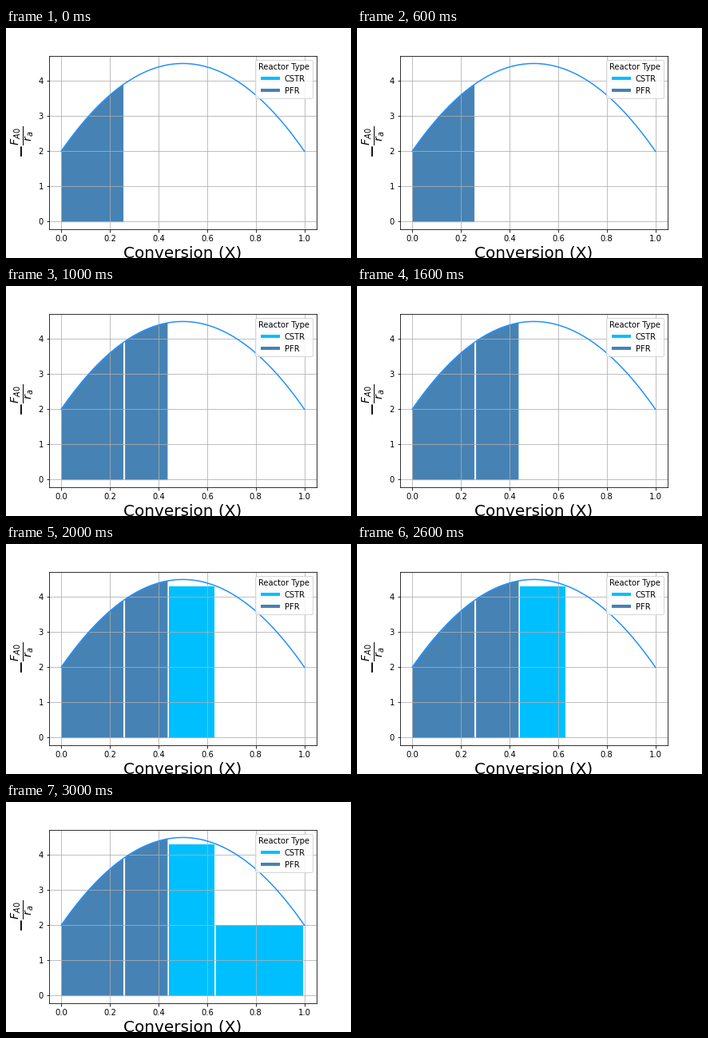
Write a matplotlib script that moves like this. It is 432 px wide and 288 px high and loops after 4000 ms.

```python
import matplotlib.pyplot as plt
import numpy as np
from matplotlib.animation import FuncAnimation
from matplotlib.lines import Line2D

COLORS = {"CSTR": "deepskyblue", "PFR": "steelblue"}
# Each reactor with the conversion reached at its outlet
REACTORS = [("PFR", 0.26), ("PFR", 0.44), ("CSTR", 0.636), ("CSTR", 1.0)]


def levenspiel(x):
    return 2 + 10 * x - 10 * x**2


plt.rcParams["font.family"] = "DejaVu Sans"
fig, ax = plt.subplots(figsize=(6, 4), dpi=72)
fig.subplots_adjust(left=0.125, right=0.9, bottom=0.125, top=0.88)

conversion = np.linspace(0, 1, 100)
ax.plot(conversion, levenspiel(conversion), color="dodgerblue")
ax.set_xlim(-0.05, 1.05)
ax.set_ylim(-0.225, 4.725)
ax.grid(True)
ax.set_xlabel("Conversion (X)", fontsize=20)
ax.set_ylabel(r"$-\frac{F_{A0}}{r_a}$", fontsize=20)
handles = [Line2D([], [], color=color, lw=4) for color in COLORS.values()]
ax.legend(handles, COLORS, title="Reactor Type", loc="upper right")


def add_reactor(kind, start, end):
    x = conversion[(conversion >= start) & (conversion < end)]
    height = levenspiel(x) if kind == "PFR" else levenspiel(end)
    return ax.fill_between(x, 0, height, color=COLORS[kind])


areas = []
inlet = 0
for kind, outlet in REACTORS:
    areas.append(add_reactor(kind, inlet, outlet))
    inlet = outlet


def update(frame):
    for i, area in enumerate(areas):
        area.set_visible(i <= frame)
    return areas


anim = FuncAnimation(fig, update, frames=len(REACTORS), interval=1000, repeat=True)
plt.show()
```
